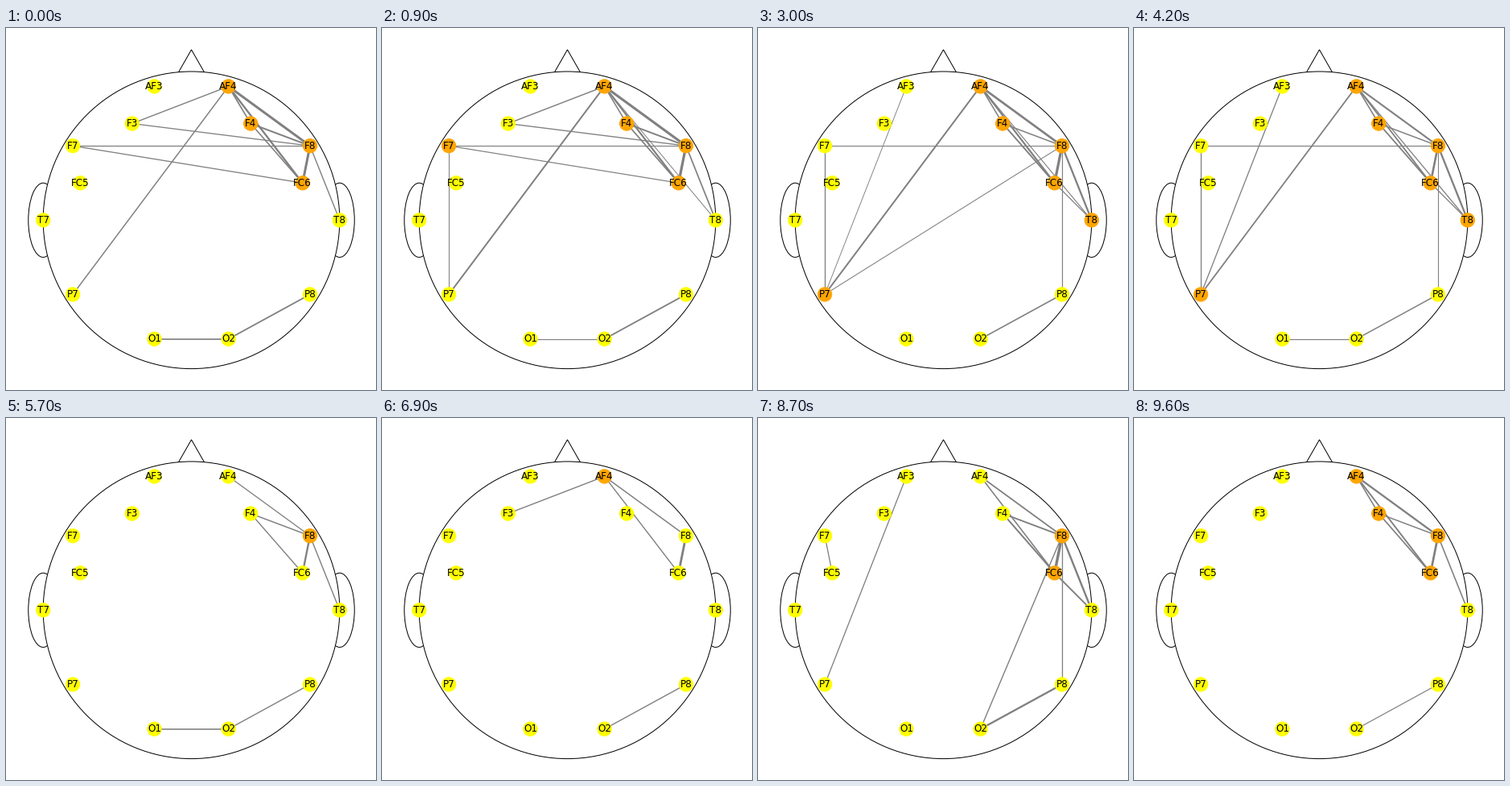
A matplotlib script for the animation above (9900 ms loop, 460 by 449 pixels).

```python
import numpy as np
import matplotlib.pyplot as plt
from matplotlib.animation import FuncAnimation
from matplotlib.collections import LineCollection
from matplotlib.patches import Ellipse, Polygon

W, H, DPI = 460, 449, 72
FRAMES, STEP = 33, 300
CX, CY, R = 230.5, 238.3, 184.3
OFF, SHOWN = 0.5, 0.9   # strength of a missing link, visibility threshold

# Right-hand electrodes in head radii; the left side mirrors them.
RIGHT = {"AF4": (.25, .9), "F4": (.4, .65), "F8": (.8, .5), "FC6": (.75, .25),
         "T8": (1, 0), "P8": (.8, -.5), "O2": (.25, -.8)}
LEFT = {"AF4": "AF3", "F4": "F3", "F8": "F7", "FC6": "FC5",
        "T8": "T7", "P8": "P7", "O2": "O1"}

# Link strengths at key moments.
KEYS = {
    0: "AF4-F3 1.4, AF4-P7 1.5, AF4-F4 1.7, AF4-F8 3, AF4-FC6 2.3, F3-F8 1.3,"
       "F7-F8 1.3, F7-FC6 1.3, F4-F8 2, F4-FC6 1.6, F8-FC6 3, F8-T8 1.4,"
       "O1-O2 1.7, O2-P8 1.8",
    6: "AF4-F3 1.3, AF4-P7 2.1, AF4-F4 1.7, AF4-F8 2.9, AF4-FC6 2.3, F3-F8 1.2,"
       "F7-F8 1.1, F7-FC6 1.3, F4-F8 1.8, F4-FC6 2, F8-FC6 3.6, F8-T8 2,"
       "AF4-T8 1.3, FC6-T8 1.3, F7-P7 1.3, F8-P7 1.4, F8-P8 1.1, O2-P8 2",
    14: "AF3-P7 1.3, AF4-P7 1.8, AF4-F4 1.6, AF4-F8 2.1, AF4-FC6 1.8, F7-F8 1.2,"
        "F4-F8 1.5, F4-FC6 1.8, F8-FC6 2.6, F8-T8 2.3, AF4-T8 1.3, FC6-T8 1.3,"
        "F7-P7 1.3, F8-P8 1.1, O1-O2 1.2, O2-P8 1.5",
    19: "AF4-F8 1.3, F4-F8 1.5, F4-FC6 1.4, F8-FC6 2.3, F8-T8 1.4,"
        "O1-O2 1.6, O2-P8 1.4",
    23: "AF4-F3 1.4, AF4-F8 1.5, AF4-FC6 1.4, F8-FC6 2.8, O2-P8 1.4",
    29: "AF3-P7 1.3, F7-FC5 1.3, AF4-F8 1.8, AF4-FC6 1.6, F4-F8 1.9, F4-FC6 2,"
        "F8-FC6 3.4, F8-T8 2.4, FC6-T8 1.9, F8-O2 1.4, F8-P8 1.3, O2-P8 2.3",
    30: "AF3-P7 1.2, AF4-P7 1.2, F7-P7 1.2, AF4-F4 1.4, AF4-F8 2, AF4-FC6 1.7,"
        "AF4-T8 1.2, F4-F8 1.8, F4-FC6 1.9, F8-FC6 3.2, F8-T8 2.1, FC6-T8 1.5,"
        "F8-P8 1.2, O2-P8 1.9",
    32: "AF4-F4 1.6, AF4-F8 2.3, AF4-FC6 1.9, F4-F8 1.5, F4-FC6 1.7,"
        "F8-FC6 2.7, F8-T8 1.6, O2-P8 1.2",
}


def parse(text):
    pairs = (item.split() for item in text.split(","))
    return {name: float(value) for name, value in pairs}


def place(x, y):
    return CX + R * x, CY - R * y


nodes = {}
for name, (x, y) in RIGHT.items():
    nodes[LEFT[name]] = place(-x, y)
    nodes[name] = place(x, y)

links = {t: parse(text) for t, text in KEYS.items()}
edges = sorted(set().union(*links.values()))
ends = [edge.split("-") for edge in edges]

# Strengths drift between key moments with a little wander on the way.
times = np.array(sorted(links))
frames = np.arange(FRAMES)
strength = np.array([
    np.interp(frames, times, [links[t].get(edge, OFF) for t in times])
    for edge in edges])
gap = np.abs(frames[:, None] - times).min(axis=1)
rng = np.random.default_rng(4)
strength += rng.normal(0, 0.12, strength.shape) * np.minimum(gap, 1)
strength[strength < SHOWN] = 0


def node_color(degree):
    return "red" if degree >= 8 else "orange" if degree >= 3 else "yellow"


fig = plt.figure(figsize=((W + .001) / DPI, (H + .001) / DPI), dpi=DPI,
                 facecolor="white")
ax = fig.add_axes([0, 0, 1, 1])
ax.set(xlim=(0, W), ylim=(H, 0))
ax.axis("off")

outline = dict(facecolor="white", edgecolor="black", linewidth=1)
for side in (-1, 1):
    ax.add_patch(Ellipse(place(side, 0), .2 * R, .5 * R, zorder=1, **outline))
ax.add_patch(Polygon([place(-.09, .99), place(0, 1.147), place(.09, .99)],
                     zorder=1, **outline))
ax.add_patch(Ellipse((CX, CY), 2 * R, 2 * R, zorder=2, **outline))

lines = LineCollection([[nodes[a], nodes[b]] for a, b in ends],
                       colors="gray", zorder=3)
ax.add_collection(lines)
dots = ax.scatter(*zip(*nodes.values()), s=300, linewidths=1, zorder=4)
for name, (x, y) in nodes.items():
    ax.text(x, y, name, size=12, family="DejaVu Sans", color="black",
            ha="center", va="center", zorder=5)


def draw(i):
    widths = strength[:, i]
    degree = dict.fromkeys(nodes, 0)
    for pair, width in zip(ends, widths):
        for name in pair:
            degree[name] += width > 0
    lines.set_linewidths(widths)
    dots.set_color([node_color(d) for d in degree.values()])
    return lines, dots


anim = FuncAnimation(fig, draw, frames=FRAMES, interval=STEP,
                     repeat=True, repeat_delay=0)
plt.show()
```
